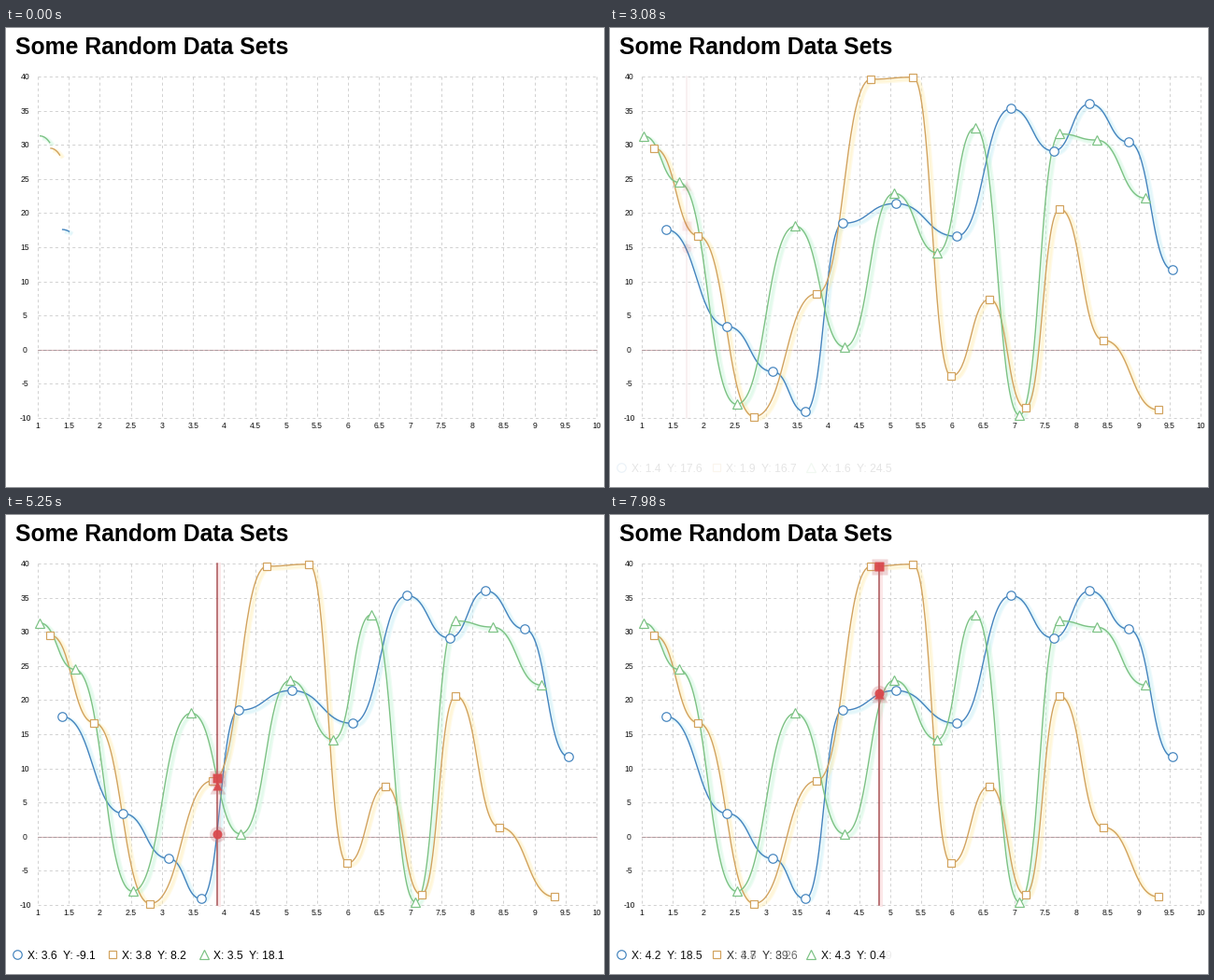
A matplotlib script for the animation above (8 s loop, 640 by 492 pixels).

```python
import numpy as np
import matplotlib.pyplot as plt
from matplotlib.animation import FuncAnimation
from matplotlib.collections import LineCollection

W, H, DPI = 640, 492, 100
PT = 72 / DPI                      # points per pixel
LEFT, RIGHT, TOP, BOTTOM = 34, 632, 52, 418
INTERVAL, LOOP, STEP = 40, 8000, 70
FADE = 300                         # legend cross-fade, ms
RED = "#d94a4e"

fig = plt.figure(figsize=(W / DPI, H / DPI), dpi=DPI, facecolor="white")
ax = fig.add_axes([0, 0, 1, 1])
ax.set(xlim=(0, W), ylim=(H, 0))
ax.axis("off")


def px(x):
    return LEFT + (np.asarray(x) - 1) * (RIGHT - LEFT) / 9


def py(y):
    return TOP + (40 - np.asarray(y)) * (BOTTOM - TOP) / 50


def smooth(u):
    u = min(max(u, 0), 1)
    return u * u * (3 - 2 * u)


def text(x, y, s, size, **kw):
    return ax.text(x, y, s, fontsize=size * PT, family="Liberation Sans", va="baseline", **kw)


def line(color, width, **kw):
    return ax.plot([], [], color=color, lw=width * PT, **kw)[0]


def wavy_steps(first, last, waves, n):
    """Even spacing from first to last, loosened by a few sine waves."""
    u = np.linspace(0, 1, n)
    return first + (last - first) * u + sum(
        a * np.sin(np.pi * k * u) for k, a in enumerate(waves, 1))


def flat_curve(xs, ys, handle, n=40):
    """Bezier segments with a horizontal tangent at every point."""
    t = np.linspace(0, 1, n)
    fx = 3 * handle * t * (1 - t) ** 2 + 3 * (1 - handle) * t ** 2 * (1 - t) + t ** 3
    fy = t * t * (3 - 2 * t)
    cx = np.concatenate([a + (b - a) * fx for a, b in zip(xs, xs[1:])])
    cy = np.concatenate([a + (b - a) * fy for a, b in zip(ys, ys[1:])])
    return cx, cy


def label(v):
    return f"{round(v, 1):g}"


class Series:
    def __init__(self, span, waves, values, color, shadow, marker, size, handle):
        xs = wavy_steps(*span, waves, len(values))
        self.data = np.column_stack([xs, values])
        self.x, self.y = px(xs), py(values)
        self.cx, self.cy = flat_curve(self.x, self.y, 0.5)
        self.track = flat_curve(self.x, self.y, handle)
        self.dist = np.r_[0, np.cumsum(np.hypot(np.diff(self.cx), np.diff(self.cy)))]
        self.shadows = [line(shadow, w, alpha=0.28, zorder=3, solid_capstyle="butt")
                        for w in (5, 2.5)]
        self.stroke = line(color, 1.4, zorder=4, solid_capstyle="butt")
        style = dict(marker=marker, ls="", mec=color, mfc="white", mew=1.2 * PT, ms=size * PT)
        self.symbols = ax.plot(self.x, self.y, zorder=5, **style)[0]
        self.key = ax.plot([], [], zorder=5, **style)[0]
        self.guide = line(color, 1.5, ls=(0, (1.6, 1.6)), zorder=6)
        picked = dict(marker=marker, ls="", mec="none")
        self.halo = ax.plot([], [], mfc="#c86a6e", ms=17 * PT, zorder=8, **picked)[0]
        self.dot = ax.plot([], [], mfc=RED, ms=10 * PT, zorder=9, **picked)[0]
        self.texts = [text(0, 475.5, "", 12) for _ in range(4)]

    def trim(self, p):
        end = p * self.dist[-1]
        n = np.searchsorted(self.dist, end)
        x = np.r_[self.cx[:n], np.interp(end, self.dist, self.cx)]
        y = np.r_[self.cy[:n], np.interp(end, self.dist, self.cy)]
        self.stroke.set_data(x, y)
        for s in self.shadows:
            s.set_data(x + 3, y + 2.5)

    def nearest(self, x):
        return int(np.argmin(np.abs(self.x - x)))

    def legend_state(self, t):
        """Former index, current index and progress of the cross-fade."""
        now = self.nearest(finger(t))
        for ago in range(10, FADE, 10):
            before = self.nearest(finger(t - ago))
            if before != now:
                return before, now, smooth(ago / FADE)
        return now, now, 1

    def gap(self, i):
        s = label(self.data[i, 1])
        return 98 + (0 if len(s) < 4 else 3.5 if s[0] in "-1" else 6)

    def draw_legend(self, t, x, alpha):
        a, b, p = self.legend_state(t)
        self.key.set_data([x], [471])
        self.key.set_alpha(alpha)
        for k, (name, dx) in enumerate((("X", 11), ("Y", 49))):
            old, new = (f"{name}: {label(self.data[i, k])}" for i in (a, b))
            q = 1 if old == new else p
            for item, s, v in zip(self.texts[2 * k:2 * k + 2], (old, new), (1 - q, q)):
                item.set(text=s, x=x + dx, alpha=v * alpha)
        return x + self.gap(a) * (1 - p) + self.gap(b) * p

    def draw_pick(self, x, snap, alpha):
        i = self.nearest(x)
        nx, ny = self.x[i], self.y[i]
        y = np.interp(x, *self.track)
        for item, v in ((self.halo, 0.28), (self.dot, 0.95)):
            item.set_data([x + (nx - x) * snap], [y + (ny - y) * snap])
            item.set_alpha(v * alpha)
        self.guide.set_data([LEFT, nx, np.nan, nx, nx], [ny, ny, np.nan, ny, BOTTOM])
        self.guide.set_alpha(snap * alpha)


def finger(t):
    """Drag to the right, slip back a little, then a second quick drag."""
    drag = 160 * smooth((t - 3400) / 2300) - 33 * smooth((t - 5700) / 360)
    return 82 + drag + 79 * (max(t - 7590, 0) / 390) ** 1.2


def draw_backdrop():
    xs, ys = np.arange(1, 10.1, 0.5), np.arange(-10, 41, 5)
    rules = [[(px(x), TOP), (px(x), BOTTOM)] for x in xs]
    rules += [[(LEFT, py(y)), (RIGHT, py(y))] for y in ys]
    ax.add_collection(LineCollection(rules, colors="#cdcdcd", linewidths=0.9 * PT,
                                     linestyles=[(0, (3.4, 3.4))], zorder=1))
    ax.plot([LEFT, RIGHT], [py(0)] * 2, color="#d9b4b9", lw=1.1 * PT, zorder=2)
    ax.plot([LEFT, RIGHT], [py(0)] * 2, color="#a8989b", lw=0.9 * PT, ls=(0, (4, 2)), zorder=2)
    for x in xs:
        text(px(x), 428.8, f"{x:g}", 8.6, ha="center", color="#111111")
    for y in ys:
        text(20.5, py(y) + 3, f"{y}", 8.6, ha="center", color="#111111")
    text(10, 27.5, "Some Random Data Sets", 24.8, weight="bold", color="black")


draw_backdrop()
series = [
    Series((1.39, 9.55), (0.176, -0.097, 0.09, 0.172, 0.022),
           (17.6, 3.4, -3.2, -9.1, 18.5, 21.4, 16.6, 35.3, 29.1, 36, 30.4, 11.7),
           "#4484be", "#c4eef6", "o", 9.5, 0.55),
    Series((1.2, 9.32), (0.337, 0.159, -0.151, -0.03, -0.072),
           (29.5, 16.7, -9.8, 8.2, 39.6, 39.9, -3.9, 7.4, -8.5, 20.6, 1.4, -8.8),
           "#d2a35e", "#ffeeb0", "s", 8.5, 0.5),
    Series((1.03, 9.11), (0.264, 0.005, -0.106, -0.053, -0.057, -0.012, -0.052),
           (31.3, 24.5, -8, 18.1, 0.4, 22.9, 14.2, 32.5, -9.6, 31.6, 30.7, 22.2),
           "#7cc284", "#c6f5d8", "^", 10, 0.75),
]
cursor_glow = line("#f4a0a4", 3, zorder=6)
cursor = line("#a84c50", 1.5, zorder=7)


def update(i):
    t = (INTERVAL * i + 30) // STEP * STEP
    grown = min((t + 85) / 1485, 1) ** 1.7
    shown = smooth((t - 1480) / 420)
    touch = smooth((t - 3030) / 250)
    snap = smooth((t - 6400) / 400) - smooth((t - 7335) / 180)
    x = finger(t)
    for item, dx, alpha in ((cursor, 0, 1), (cursor_glow, 2, 0.25)):
        item.set_data([x + dx] * 2, [TOP, BOTTOM])
        item.set_alpha(alpha * touch * (1 - snap))
    key_x = 12
    for s in series:
        s.trim(grown)
        s.symbols.set_alpha(shown)
        s.draw_pick(x, snap, touch)
        key_x = s.draw_legend(t, key_x, touch)
    return []


anim = FuncAnimation(fig, update, frames=LOOP // INTERVAL, interval=INTERVAL,
                     init_func=lambda: [], repeat=True, repeat_delay=0)
plt.show()
```
